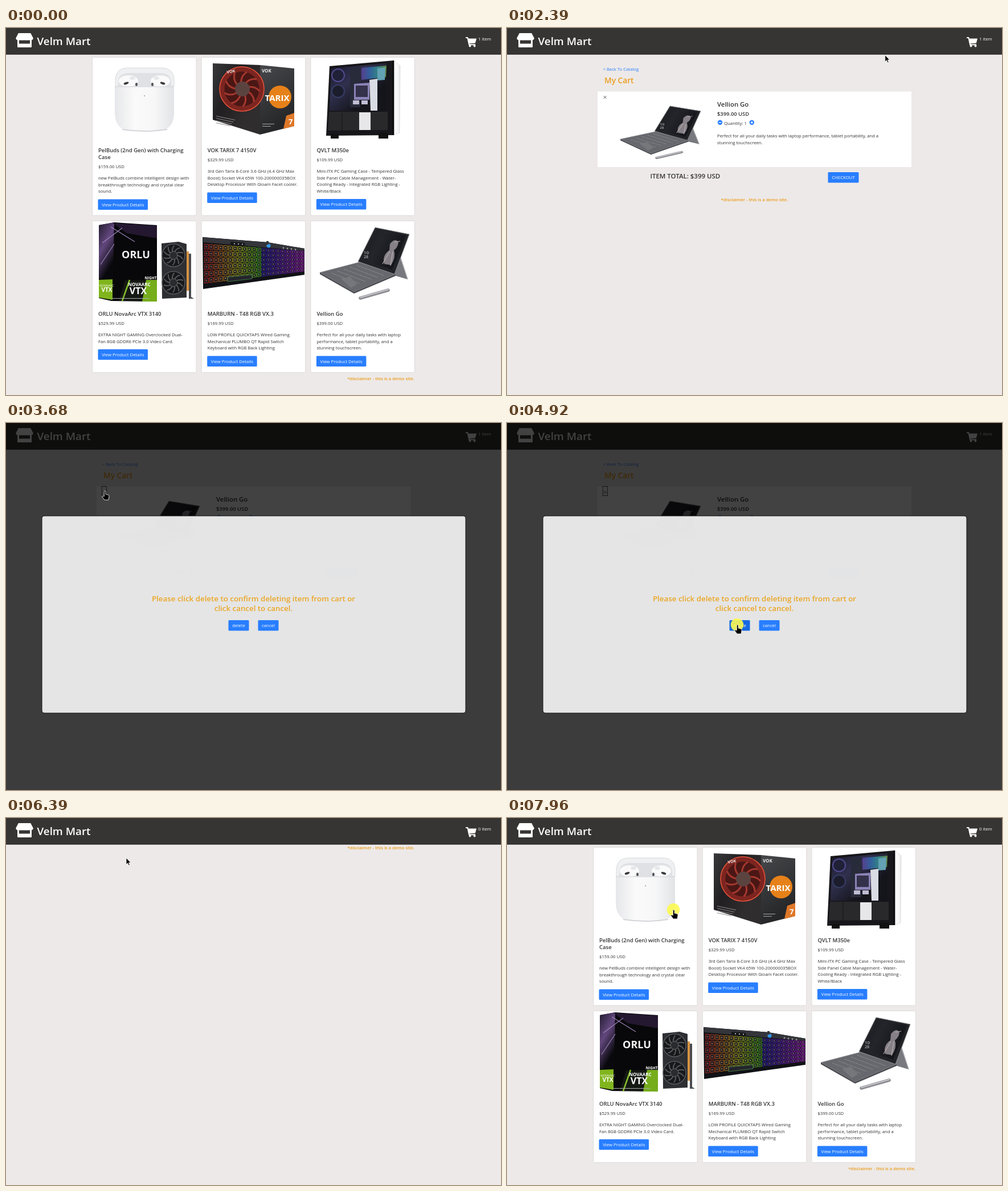
An HTML page that plays this animation: 869 by 644 pixels, repeating every 8 s.

```html
<!DOCTYPE html>
<html lang="en">
<head>
<meta charset="utf-8">
<title>Shop demo</title>
<style>
  html, body { margin: 0; width: 100%; height: 100%; overflow: hidden; background: #ede9e8; }
  svg { display: block; width: 100vw; height: 100vh; font-family: "Open Sans", "Noto Sans", sans-serif; }
</style>
</head>
<body>
<svg id="stage" viewBox="0 0 869 644"></svg>
<script>
const LOOP = 8000, BLUE = '#287eff', GOLD = '#eb9d1c', INK = '#333', BAR = '#363533';

// Shape helpers
const rect = (x, y, w, h, fill, rx = 0, more = '') =>
  `<rect x="${x}" y="${y}" width="${w}" height="${h}" rx="${rx}" fill="${fill}" ${more}/>`;
const disc = (x, y, r, fill, more = '') => `<circle cx="${x}" cy="${y}" r="${r}" fill="${fill}" ${more}/>`;
const oval = (x, y, rx, ry, fill, more = '') =>
  `<ellipse cx="${x}" cy="${y}" rx="${rx}" ry="${ry}" fill="${fill}" ${more}/>`;
const poly = (points, fill, more = '') => `<polygon points="${points}" fill="${fill}" ${more}/>`;
const path = (d, fill, more = '') => `<path d="${d}" fill="${fill}" ${more}/>`;
const line = (d, stroke, width = 1, more = '') => path(d, 'none', `stroke="${stroke}" stroke-width="${width}" ${more}`);
const group = (id, content) => `<g id="${id}">${content}</g>`;
const text = (x, y, size, label, fill = INK, more = '') =>
  `<text x="${x}" y="${y}" font-size="${size}" fill="${fill}" ${more}>${label}</text>`;
const SEMI = 'font-weight="600"', BOLD = 'font-weight="700"', MID = 'text-anchor="middle"';
const range = (n, fn) => Array.from({ length: n }, (_, i) => fn(i)).join('');
const ramp = (id, angle, ...colors) =>
  `<linearGradient id="${id}" gradientTransform="rotate(${angle})">` +
  colors.map((c, i) => `<stop offset="${i / (colors.length - 1)}" stop-color="${c}"/>`).join('') + '</linearGradient>';
const button = (x, y, w, label, more = '') =>
  rect(x, y, w, 18.5, BLUE, 1.5, more) + text(x + w / 2, y + 12.2, 7.8, label, '#fff', MID);

// Product pictures
const earbuds = () =>
  path('M192 102V90Q193 70 214 70H272Q294 70 295 90V102Z', '#eff0f2', 'stroke="#d9dadd"') +
  path('M197 102V93Q199 79 216 79H270Q288 79 290 93V102Z', '#dfe1e4') +
  [[215, 1], [271, -1]].map(([x, s]) =>
    oval(x, 93, 17, 10, '#fafafa') + oval(x - 4 * s, 97, 4.5, 2, '#3b3b3f', `transform="rotate(${-18 * s} ${x - 4 * s} 97)"`) +
    oval(x + 14 * s, 99, 2, 3, '#55565a') + oval(x + 7 * s, 88, 5, 3, '#e6e7ea')).join('') +
  path('M191 103H295V150Q294 181 264 181H222Q192 181 191 150Z', 'url(#shell)') +
  line('M191 103H295', '#d0d2d6') + line('M204 178Q243 184 283 178', '#d5d6da', 2) + disc(243, 119, .9, '#8a8a8a');

const processor = () =>
  poly('363,62 446,65 446,187 363,161', 'url(#boxFront)') +
  poly('446,65 506,71 506,172 446,187', 'url(#boxSide)') +
  disc(414, 107, 35, '#4a1715', 'stroke="#7d2520" stroke-width="9"') +
  range(9, i => line('M414 107Q424 87 440 90', '#a5382f', 3, `transform="rotate(${i * 40} 414 107)"`)) +
  disc(414, 107, 39, 'none', 'stroke="#e0523b" stroke-width="1.6"') +
  disc(415, 107, 13, '#5b4340') +
  text(388, 80, 7, 'VOK', '#eee', BOLD + ' transform="rotate(-10 388 80)"') +
  text(449, 78, 8, 'VOK', '#eee', BOLD) +
  range(4, i => rect(369, 154 + i * 4, 34 - i * 3, 1, '#8b8b8b', 0, `transform="rotate(12 369 ${154 + i * 4})"`)) +
  disc(481, 121, 20, '#e68119') +
  text(476, 128, 15, 'TARIX', '#fff', BOLD + MID) +
  poly('492,154 506,149 506,172 487,177', '#df7828') + text(496, 169, 13, '7', '#fff', BOLD) +
  rect(450, 168, 21, 1, '#aaa') + rect(450, 172, 15, 1, '#aaa');

const tower = () =>
  poly('568,67 680,57 680,188 562,189', '#17171b') +
  poly('680,57 692,66 691,184 680,188', 'url(#shell)', 'stroke="#d5d5d8" stroke-width=".6"') +
  poly('571,71 668,62 668,147 568,145', 'url(#glass)') +
  disc(583, 83, 11, '#202037', 'stroke="#514a91" stroke-width="2"') +
  disc(583, 111, 11, '#1c1d2c', 'stroke="#363c64" stroke-width="2"') +
  poly('604,70 622,68 622,139 604,139', '#282b39') +
  poly('611,98 638,96 638,126 611,126', '#8b83b7') + rect(614, 101, 21, 20, '#34314a') +
  poly('624,70 668,66 667,86 624,91', 'url(#rainbow)', 'opacity=".75"') +
  poly('638,91 652,89 652,145 640,145', '#d9dce5') + poly('652,71 666,69 665,91 652,92', '#63a1b4') +
  rect(609, 127, 11, 7, '#bfbdd2') + rect(624, 127, 11, 7, '#bfbdd2') +
  poly('567,147 670,147 670,179 565,180', '#29292b') +
  rect(620, 148, 20, 31, '#e7e7ea') + line('M590 148V180', '#151515', 1) +
  line('M680 57V188', '#070709', 2.5) + rect(570, 186, 14, 8, '#111') + rect(654, 184, 17, 10, '#111');

const fan = (x, y) => disc(x, y, 20, '#17181a', 'stroke="#55585d" stroke-width="1.5"') +
  range(10, i => line(`M${x} ${y}q9 -8 17 -4`, '#55585c', 2, `transform="rotate(${i * 36} ${x} ${y})"`)) +
  disc(x, y, 7, '#292b2e', 'stroke="#67696c"');
const graphics = () =>
  poly('163,346 190,341 265,346 265,480 185,479 163,474', '#08080a') +
  poly('163,346 190,341 188,442 163,440', 'url(#violet)') +
  poly('187,342 265,347 265,369 212,360', '#241830') +
  line('M169 377L204 351M166 415L190 379M184 349L226 375', '#9b83b9', 1.2) +
  poly('163,442 187,441 187,477 163,473', '#80b51d') + poly('198,478 209,443 265,442 265,480', '#151914') +
  poly('246,442 265,442 265,480 239,480', '#76ad1c') + line('M204 479L217 442', '#88c22b', 2.5) +
  text(228, 404, 18, 'ORLU', '#f4f4f4', BOLD + MID) +
  text(254, 441, 6.5, 'NIGHT', '#fff', BOLD + MID) +
  text(234, 453, 8, 'NOVAARC', '#fff', BOLD + MID) + text(232, 467, 16, 'VTX', '#fff', BOLD + MID) +
  text(177, 454, 5.5, 'NOVAARC', '#fff', MID) + text(177, 463, 10, 'VTX', '#fff', BOLD + MID) +
  rect(186, 474, 65, 1, '#aaa') +
  poly('273,378 303,375 317,379 317,473 274,475', '#2d2f32') + rect(317, 392, 4, 69, '#d69242') +
  poly('321,396 325,396 325,472 330,475 321,475', '#4a4b4e') + fan(294, 399) + fan(294, 447);

const keyboard = () => {
  const spot = (u, v) => [347 + 176 * u, 379 + 13 * u + v * (72 - 36 * u)];
  const key = (row, col) => {
    const u = (col + .2) / 21, v = row / 6, w = .038, h = .125;
    const corners = [spot(u, v), spot(u + w, v), spot(u + w, v + h), spot(u, v + h)].join(' ');
    const hue = u < .55 ? u * 190 : 180 + u * 115;
    const [x, y] = spot(u + .018, v + .06);
    return poly(corners, '#202024', `stroke="hsl(${hue},75%,43%)" stroke-width=".8"`) +
      disc(x, y, .9, `hsl(${hue},75%,64%)`);
  };
  return poly('345,367 459,376 524,387 524,433 346,458', '#111216') +
    poly('346,367 459,376 524,387 524,391 346,376', '#33353a') +
    range(6, row => range(21, col => key(row, col))) +
    poly('389,437 432,433 432,440 389,445', '#24242a', 'stroke="#57a25c" stroke-width=".7"') +
    rect(394, 375, 26, 5, '#15161a', 2, 'transform="rotate(5 394 375)"') +
    range(3, i => disc(401 + i * 7, 378.5 + i * .5, 1, '#e5e5e5')) +
    disc(461, 382, 3.5, '#3497ea') + rect(457, 374, 4, 6, '#333') + range(4, i => disc(487 + i * 7, 386 + i, 1.4, '#999'));
};

const laptop = () =>
  poly('682,390 690,397 705,441 681,434', '#77797e') + line('M691 398L705 441', '#a2a3a7', 1.4) +
  poly('551,429 620,411 684,432 611,463', '#66686e', 'stroke="#8d8e92" stroke-width=".8"') +
  poly('551,429 611,463 684,432 684,435 611,466 551,432', '#4b4c51') +
  range(5, i => line(`M${571 + i * 11} ${430 - i * 3.5}L${620 + i * 11} ${448 - i * 3.4}`, '#8b8d91', 1, 'stroke-dasharray="4 1"')) +
  poly('588,440 604,436 616,450 605,456', '#75777b') +
  poly('648,350 708,362 682,432 618,410', '#222327', 'stroke="#8b8d90" stroke-width="1"') +
  poly('651,354 702,364 678,424 624,406', 'url(#screen)') +
  path('M674 379Q683 367 689 376Q688 385 681 390Q685 402 676 416L664 414Q660 399 673 390Z', '#858087') +
  line('M682 376L692 374M674 392L661 414M679 392L675 417', '#b8adaa', 1.2) +
  text(628, 397, 8, '10', '#ddd') + text(628, 404, 7, '28', '#ddd') +
  line('M622 474L671 460', '#8b8b91', 5.5, 'stroke-linecap="round"') +
  line('M622 473L671 459', '#c5c6ca', 2, 'stroke-linecap="round"');

// Pages
const products = [
  [['PelBuds (2nd Gen) with Charging', 'Case'], '159.00', earbuds,
    ['new PelBuds combine intelligent design with', 'breakthrough technology and crystal clear', 'sound.']],
  [['VOK TARIX 7 4150V'], '329.99', processor,
    ['3rd Gen Tarix 8-Core 3.6 GHz (4.4 GHz Max', 'Boost) Socket VK4 65W 100-200000035BOX', 'Desktop Processor With Gloam Facet cooler.']],
  [['QVLT M350e'], '109.99', tower,
    ['Mini-ITX PC Gaming Case - Tempered Glass', 'Side Panel Cable Management - Water-', 'Cooling Ready - Integrated RGB Lighting -', 'White/Black']],
  [['ORLU NovaArc VTX 3140'], '529.99', graphics,
    ['EXTRA NIGHT GAMING Overclocked Dual-', 'Fan 8GB GDDR6 PCIe 3.0 Video Card.']],
  [['MARBURN - T48 RGB VX.3'], '169.99', keyboard,
    ['LOW PROFILE QUICKTAPS Wired Gaming', 'Mechanical PLUMBO QT Rapid Switch', 'Keyboard with RGB Back Lighting']],
  [['Vellion Go'], '399.00', laptop,
    ['Perfect for all your daily tasks with laptop', 'performance, tablet portability, and a', 'stunning touchscreen.']],
];

function productCard([title, price, picture, about], i) {
  const x = 151.5 + (i % 3) * 191.7, y = i < 3 ? 51.5 : 338.5, left = x + 10.5;
  const priceY = y + 182.5 + (title.length - 1) * 12, aboutY = priceY + 20;
  return rect(x, y, 182.5, i < 3 ? 277.5 : 266, '#fff', 2, 'stroke="#dedbda"') + picture() +
    title.map((s, k) => text(left, y + 166 + k * 12, 9.5, s, INK, SEMI)).join('') +
    text(left, priceY, 7.7, `$${price} USD`) +
    about.map((s, k) => text(left, aboutY + k * 11.7, 7.7, s)).join('') +
    button(left - .5, aboutY + (about.length - 1) * 11.7 + 11, 87.5, 'View Product Details');
}

const sign = (x, plus) => disc(x, 165.8, 4.2, BLUE) + line(`M${x - 2.3} 165.8h4.6${plus ? `M${x} 163.5v4.6` : ''}`, '#fff', 1.3);
const note = '*disclaimer - this is a demo site.';

const header = rect(0, 0, 869, 46.5, BAR) + rect(0, 45.5, 869, 1, '#2a2928') +
  path('M22 9H43L47.5 17.5' + 'a3.75 3.75 0 0 1-7.5 0'.repeat(4) + 'Z', '#fff') +
  rect(20, 19, 25, 15, '#fff', 1) + rect(23, 21.5, 19, 6, BAR) +
  path('M22 9H43L47.5 17.5' + 'a3.75 3.75 0 0 1-7.5 0'.repeat(4) + 'Z', '#fff') +
  text(54.5, 29.8, 18.8, 'Velm Mart', '#fff', SEMI) +
  poly('811,18.5 826,18.5 823.8,26.5 812.5,27.5', '#fff') +
  line('M807 17h3.4l2.6 12.3h11', '#fff', 1.9) + disc(814.5, 31.5, 1.9, '#fff') + disc(822.5, 31.5, 1.9, '#fff') +
  text(829, 21.7, 7.8, '1 item', '#fff', 'id="count"');

const catalog = group('products', products.map(productCard).join('')) +
  text(717, 617.5, 7.7, note, GOLD, SEMI + ' text-anchor="end" id="catalogNote"');

const cart = text(168.5, 75, 7.7, '&lt; Back To Catalog', BLUE) +
  text(171, 97, 13.7, 'My Cart', GOLD, SEMI) +
  group('cartItem',
    rect(159, 111.5, 551, 132.5, '#fff') +
    rect(168, 111.5, 8.5, 16, 'none', 0, 'id="focus" stroke="#555"') +
    line('M169.5 119l5 5m0 -5l-5 5', '#555', 1) +
    `<g transform="translate(199 137) scale(.898 .734) translate(-551 -350)">${laptop()}</g>` +
    text(369, 137.8, 11.4, 'Vellion Go', INK, SEMI) + text(369, 154.3, 9.4, '$399.00 USD', INK, SEMI) +
    sign(374, false) + text(381, 169.8, 7.8, 'Quantity: 1') + sign(429.8, true) +
    text(369, 192.2, 7.7, 'Perfect for all your daily tasks with laptop performance, tablet portability, and a') +
    text(369, 204, 7.7, 'stunning touchscreen.') +
    text(251.5, 264.3, 11.45, 'ITEM TOTAL: $399 USD', INK, SEMI) + button(563.5, 253, 54, 'CHECKOUT')) +
  text(434.5, 304, 7.7, note, GOLD, SEMI + MID + ' id="cartNote"');

const modal = rect(0, 0, 869, 644, '#000', 0, 'opacity=".74"') +
  rect(63, 163, 744, 346, '#ebebeb', 4, 'fill-opacity=".97" stroke="#111"') +
  text(434.5, 313.3, 13.35, 'Please click delete to confirm deleting item from cart or', '#eba623', SEMI + MID) +
  text(434.5, 330.3, 13.35, 'click cancel to cancel.', '#eba623', SEMI + MID) +
  button(390.5, 346, 36, 'delete', 'id="confirm"') + button(442.5, 346, 36, 'cancel');

const edge = 'stroke="#fff" stroke-width=".8" stroke-linejoin="round"';
const cursor = disc(0, 0, 11.2, '#fbfa50', 'id="click" opacity=".9"') +
  path('M0 0V11.5L2.7 9.2L4.5 13.2L6.4 12.3L4.6 8.5H8Z', '#000', edge + ' id="arrow"') +
  path('M-.7 1Q.7 -1 2.1 1V6L7 7.3Q8.3 8 8 10L7 16H-.2L-4.5 10Q-3.5 8 -.7 9.8Z', '#000', edge + ' id="hand"');

stage.innerHTML = '<defs>' +
  ramp('shell', 0, '#e6e7ea', '#fafafa', '#f7f7f8', '#e2e3e6') + ramp('boxFront', 35, '#38383b', '#211f21', '#302d2e') +
  ramp('boxSide', 70, '#47484b', '#262729') + ramp('glass', 45, '#18192a', '#30304e', '#14141b') +
  ramp('rainbow', 0, '#6345a4', '#3573bb', '#39a69d', '#7cad4b') + ramp('violet', 65, '#211a2c', '#62477d', '#09090d') +
  ramp('screen', 25, '#17191e', '#24252a', '#15161b') + '</defs>' +
  rect(0, 0, 869, 644, '#ede9e8') + group('catalog', catalog) + group('cart', cart) + header +
  group('modal', modal) + group('cursor', cursor);

// Timeline: start, end, visible steps, Bezier points
const moves = [
  [380, 610, 4, [[785, 650], [790, 480], [812, 335]]],
  [840, 1620, 11, [[812, 335], [845, 180], [819, 27]]],
  [2390, 2540, 3, [[819, 27], [220, 106]]],
  [2860, 3350, 7, [[220, 106], [173, 119]]],
  [4060, 4760, 10, [[173, 119], [404, 354]]],
  [5240, 6010, 11, [[404, 354], [211, 70]]],
  [7020, 7800, 11, [[211, 70], [240, 420], [700, 380], [292, 161]]],
];
const handTimes = [[1620, 2390], [3350, 4060], [4760, 5240], [6010, 6390], [7020, LOOP]];
const clickTimes = [[1770, 1860], [3580, 3680], [4920, 5000], [7870, LOOP]];

const bezier = (points, u) => points.length === 1 ? points[0] :
  bezier(points.slice(1).map((p, i) => p.map((c, k) => points[i][k] + (c - points[i][k]) * u)), u);
const during = (t, spans) => spans.some(([a, b]) => t >= a && t < b);
const show = (id, on) => document.getElementById(id).style.display = on ? '' : 'none';
const set = (id, name, value) => document.getElementById(id).setAttribute(name, value);

function cursorAt(t) {
  const move = moves.findLast(([from]) => t >= from);
  if (!move) return null;
  const [from, to, steps, points] = move;
  const u = Math.min(1, (Math.floor((t - from) / (to - from) * (steps - 1)) + 1) / steps);
  return bezier(points, u * u * (3 - 2 * u));
}

function draw(t) {
  const inCart = during(t, [[1930, 6390]]), loading = during(t, [[6390, 6470]]), emptied = t >= 5240;
  show('catalog', !inCart);
  show('products', !loading);
  set('catalogNote', 'y', loading ? 55 : 617.5);
  show('cart', inCart);
  show('cartItem', !emptied);
  set('cartNote', 'y', emptied ? 135 : 304);
  show('focus', during(t, [[3580, 5070]]));
  show('modal', during(t, [[3680, 5070]]));
  set('confirm', 'fill', t >= 4760 ? '#1769e0' : BLUE);
  document.getElementById('count').textContent = emptied ? '0 item' : '1 item';

  const point = cursorAt(t), hand = during(t, handTimes);
  show('cursor', point);
  if (point) set('cursor', 'transform', `translate(${point})`);
  show('hand', hand);
  show('arrow', !hand);
  show('click', during(t, clickTimes));
}

const start = performance.now();
function tick() {
  draw((performance.now() - start) % LOOP);
  requestAnimationFrame(tick);
}
tick();
</script>
</body>
</html>
```
